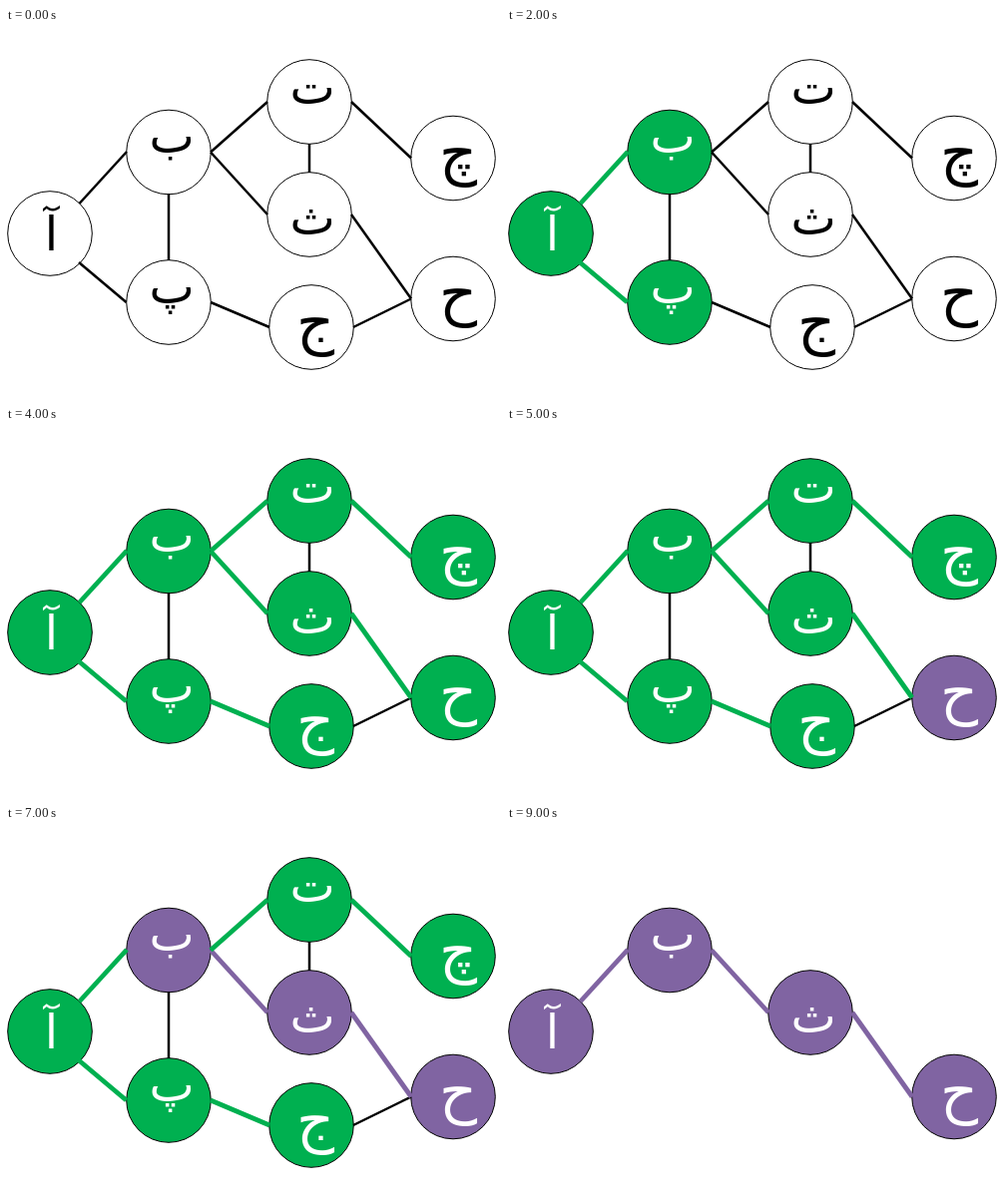
These frames come from a looping animation (496x372 px, 10 s). An HTML page:

```html
<!DOCTYPE html>
<html lang="fa">
<head>
<meta charset="utf-8">
<title>Breadth-first search</title>
<style>
  html, body { margin: 0; width: 100%; height: 100%; overflow: hidden; background: #fff; }
  svg { display: block; width: 496px; height: 372px; }
  text { font-family: "DejaVu Sans", sans-serif; font-size: 48px; text-anchor: middle; }
  .hooked { font-size: 59px; }
</style>
</head>
<body>
<svg id="stage" viewBox="0 0 496 372"></svg>
<script>
const GREEN = '#00b050', PURPLE = '#8064a2';
const STEP = 1000, STEPS = 10, LAST = 9;

// found / traced: step at which the node turns green / purple
const nodes = [
  { x: 44,  y: 206,   letter: 'آ', tx: 45.5,  ty: 223, found: 1, traced: 8 },
  { x: 163, y: 124.5, letter: 'ب', tx: 166,   ty: 125, found: 2, traced: 7 },
  { x: 163, y: 275,   letter: 'پ', tx: 166,   ty: 276, found: 2 },
  { x: 304, y: 74,    letter: 'ت', tx: 307,   ty: 76,  found: 3 },
  { x: 304, y: 187,   letter: 'ث', tx: 307,   ty: 207, found: 3, traced: 6 },
  { x: 306, y: 300,   letter: 'ج', tx: 310,   ty: 316, found: 3, hooked: true },
  { x: 448, y: 130.5, letter: 'چ', tx: 453,   ty: 146, found: 4, hooked: true },
  { x: 448, y: 271.5, letter: 'ح', tx: 453,   ty: 287, found: 4, traced: 5, hooked: true }
];

const edges = [
  { line: [163, 166, 163, 233] },
  { line: [304, 116, 304, 145] },
  { line: [348, 300, 406, 271.5] },
  { line: [73.5, 176, 121, 124], found: 2, traced: 8 },
  { line: [73, 235, 120.5, 275], found: 2 },
  { line: [205, 124.5, 262, 187], found: 3, traced: 7 },
  { line: [205, 124.5, 262, 74], found: 3 },
  { line: [205, 275, 264, 300], found: 3 },
  { line: [346, 74, 406, 130.5], found: 4 },
  { line: [346, 187, 406, 271.5], found: 4, traced: 6 }
];

const stage = document.getElementById('stage');

function set(el, attrs) {
  for (const key in attrs) el.setAttribute(key, attrs[key]);
}

function add(name, attrs) {
  const el = document.createElementNS('http://www.w3.org/2000/svg', name);
  set(el, attrs);
  return stage.appendChild(el);
}

for (const node of nodes) {
  node.circle = add('circle', { cx: node.x, cy: node.y, r: 42.3, stroke: '#000', 'stroke-width': 1 });
  node.label = add('text', { x: node.tx, y: node.ty, class: node.hooked ? 'hooked' : '' });
  node.label.textContent = node.letter;
}
for (const edge of edges) {
  const [x1, y1, x2, y2] = edge.line;
  edge.path = add('line', { x1, y1, x2, y2 });
}

const colorAt = (item, step, initial) =>
  step >= item.traced ? PURPLE : step >= item.found ? GREEN : initial;

const visibility = (item, step) => step < LAST || item.traced ? 'visible' : 'hidden';

function draw(step) {
  for (const node of nodes) {
    const shown = visibility(node, step);
    set(node.circle, { fill: colorAt(node, step, '#fff'), visibility: shown });
    set(node.label, { fill: step >= node.found ? '#fff' : '#000', visibility: shown });
  }
  for (const edge of edges) {
    set(edge.path, {
      stroke: colorAt(edge, step, '#000'),
      'stroke-width': step >= edge.found ? 4.8 : 2.5,
      visibility: visibility(edge, step)
    });
  }
}

function tick() {
  draw(Math.floor(performance.now() / STEP) % STEPS);
  requestAnimationFrame(tick);
}
tick();
</script>
</body>
</html>
```
